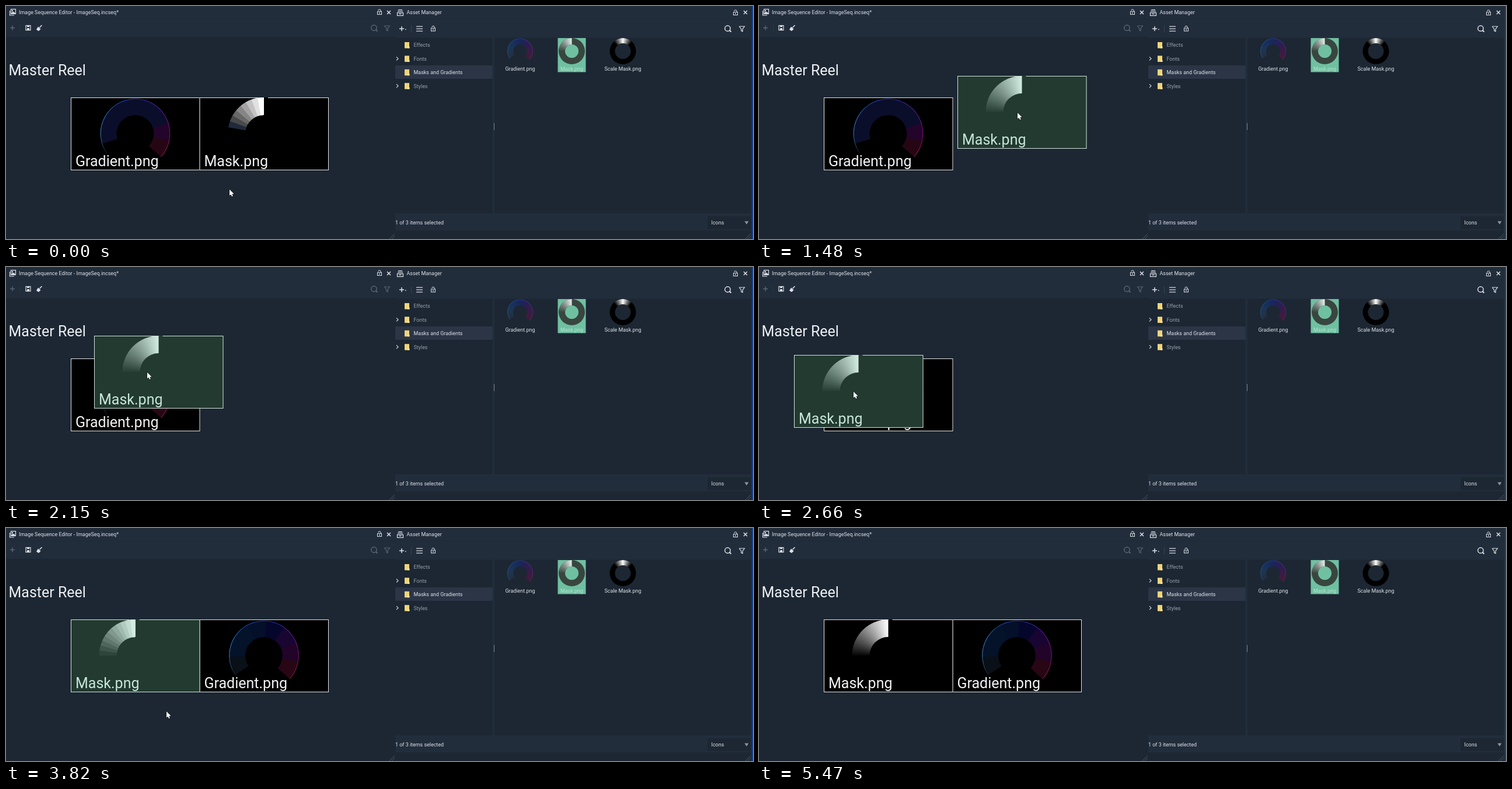
Recreate the animation shown at these times as an HTML page with a canvas. Size 1280 px wide and 400 px high, loop 6.51 s.

```html
<!DOCTYPE html>
<html lang="en">
<head>
<meta charset="utf-8">
<title>Reordering a reel</title>
<style>
html, body { margin: 0; width: 100%; height: 100%; overflow: hidden; background: #1c2733; }
canvas { display: block; }
</style>
</head>
<body>
<canvas id="stage" width="1280" height="400"></canvas>
<script>
const ctx = document.getElementById('stage').getContext('2d');
const LOOP = 6510, TICK = 131.7;
const GRAB = 10, DROP = 23, DESELECT = 30, LEAVE = 41; // in ticks
const BG = '#1c2733', BAR = '#222d3c', LIGHT = '#dde2e8', DIM = '#98a1ac', FAINT = '#596473';
const ROW = 157, CARD_W = 220.5, CARD_H = 124;
const slotX = slot => 111 + slot * CARD_W;

const linear = u => u;
const smooth = u => u * u * (3 - 2 * u);
const easeOut = u => 1 - (1 - u) ** 2;

// Pointer strokes between two ticks; bend lifts or lowers the middle of the path
const strokes = [
  { from: 3, to: 9, x: 434, y: 220, ease: smooth },
  { from: 9, to: 13, x: 446, y: 171, ease: easeOut },
  { from: 13, to: 14, x: 391, y: 159 },
  { from: 14, to: 16, x: 242, y: 181 },
  { from: 16, to: 20, x: 162, y: 214, ease: easeOut },
  { from: 25, to: 29, x: 275, y: 315 },
  { from: 31, to: 34, x: 596, y: 249, bend: 35 },
  { from: 34, to: 40, x: 1214, y: 394, bend: -45 }
];

function pointerAt(tick) {
  let x = 383, y = 315;
  for (const { from, to, x: endX, y: endY, ease = linear, bend = 0 } of strokes) {
    if (tick <= from) break;
    const u = ease(Math.min(1, (tick - from) / (to - from)));
    x += (endX - x) * u;
    y += (endY - y) * u + 4 * bend * u * (1 - u);
  }
  return { x, y };
}

// The dragged card trails sideways behind the pointer
function draggedCardAt(tick) {
  const now = pointerAt(tick), before = pointerAt(tick - 1);
  return { x: Math.floor(now.x - 102 - .15 * (now.x - before.x)), y: Math.floor(now.y - 63) };
}

const rad = degrees => degrees * Math.PI / 180;
const mix = (a, b, k) => `rgb(${a.map((v, i) => Math.round(v + (b[i] - v) * k))})`;

function rect(x, y, w, h, color) {
  ctx.fillStyle = color;
  ctx.fillRect(x, y, w, h);
}

function frame(x, y, w, h, color, width = 1) {
  ctx.strokeStyle = color;
  ctx.lineWidth = width;
  ctx.strokeRect(x, y, w, h);
}

function text(s, x, y, color = LIGHT, size = 8.95, align = 'left') {
  ctx.font = `${size}px Roboto, sans-serif`;
  ctx.textAlign = align;
  ctx.fillStyle = color;
  ctx.fillText(s, x, y);
}

function trace(points) {
  ctx.beginPath();
  for (let i = 0; i < points.length; i += 2) ctx.lineTo(points[i], points[i + 1]);
}

function line(color, width, ...points) {
  trace(points);
  ctx.strokeStyle = color;
  ctx.lineWidth = width;
  ctx.stroke();
}

function shape(color, ...points) {
  trace(points);
  ctx.fillStyle = color;
  ctx.fill();
}

function ring(x, y, inner, outer, from, to, fill) {
  ctx.fillStyle = fill;
  ctx.beginPath();
  ctx.arc(x, y, outer, rad(from), rad(to));
  ctx.arc(x, y, inner, rad(to), rad(from), true);
  ctx.fill();
}

// An arc whose colors blend evenly from one end to the other
function sweep(x, y, inner, outer, from, to, colors) {
  const gradient = ctx.createConicGradient(rad(from), x, y);
  colors.forEach((c, i) => gradient.addColorStop(i / (colors.length - 1) * (to - from) / 360, c));
  ring(x, y, inner, outer, from, to, gradient);
}

// An arc cut into equal flat wedges; each runs to the end so no seams show
function wedges(x, y, inner, outer, from, to, colors) {
  colors.forEach((c, i) => ring(x, y, inner, outer, from + (to - from) * i / colors.length, to, c));
}

function lock(x, y) {
  frame(x - 3.5, y - .5, 7, 5, LIGHT);
  ctx.beginPath();
  ctx.arc(x, y - 2, 2.2, Math.PI, 0);
  ctx.lineTo(x + 2.2, y - .5);
  ctx.stroke();
  rect(x - .7, y + 1, 1.4, 2, LIGHT);
}

function close(x, y) {
  line(LIGHT, 1.5, x - 3, y - 3, x + 3, y + 3);
  line(LIGHT, 1.5, x + 3, y - 3, x - 3, y + 3);
}

function plus(x, y, color) {
  rect(x - 4, y - .75, 8, 1.5, color);
  rect(x - .75, y - 4, 1.5, 8, color);
}

function magnifier(x, y, color) {
  ctx.strokeStyle = color;
  ctx.lineWidth = 1.5;
  ctx.beginPath();
  ctx.arc(x - .5, y - .5, 4.7, 0, 7);
  ctx.stroke();
  line(color, 2, x + 2.5, y + 2.5, x + 5.5, y + 5.5);
}

function funnel(x, y, color) {
  line(color, 1.2, x - 4.5, y - 4, x + 4.5, y - 4, x + 1.2, y + .5, x + 1.2, y + 4.5,
    x - 1.2, y + 3.5, x - 1.2, y + .5, x - 4.8, y - 4);
}

function grip(x) {
  for (const size of [9, 5]) line('#4b5666', 1, x - size, 400, x, 400 - size);
}

function editorPanel() {
  rect(0, 0, 667, 53, BAR);
  rect(0, 22, 667, 1, '#1f2a38');
  frame(8.5, 5.5, 8, 8, LIGHT, 1.2);
  line(LIGHT, 1.2, 6.5, 8, 6.5, 16, 14, 16);
  shape(LIGHT, 9, 13, 11.5, 9, 13, 11, 14, 10, 16, 13);
  rect(10, 7, 2, 2, LIGHT);
  text('Image Sequence Editor - ImageSeq.incseq*', 22, 14);
  lock(640, 10);
  close(656, 11);

  plus(11, 37.5, FAINT);
  rect(24, 32, 1, 12, '#2b3646');
  frame(34, 33.5, 8, 8, LIGHT, 1.2);
  rect(36, 33, 4, 3, LIGHT);
  rect(36, 38, 4, 3, LIGHT);
  line(LIGHT, 1.6, 61.5, 33, 57.5, 37);
  shape(LIGHT, 55, 35.5, 59.5, 39.5, 56, 43, 52, 40.5);
  magnifier(631, 38, FAINT);
  funnel(653, 38, FAINT);

  text('Master Reel', 4.5, 119, '#eef0f3', 25);
  grip(666);
}

function assetPanel() {
  rect(667, 0, 613, 54.5, BAR);
  rect(667, 22, 613, 1, '#1f2a38');
  line(LIGHT, 1.2, 672, 6.5, 679, 6.5);
  line(LIGHT, 1.2, 671, 9, 680, 9);
  frame(670.5, 11.5, 10, 5, LIGHT, 1.2);
  rect(673.5, 13, 4, 1.2, LIGHT);
  text('Asset Manager', 686.5, 14.3);
  lock(1250, 11);
  close(1267, 11);

  plus(678, 39, LIGHT);
  rect(684, 39.5, 1.5, 1.5, LIGHT);
  rect(694, 33, 1, 12, '#364152');
  for (let i = 0; i < 3; i++) rect(703, 34.5 + 4 * i, 11, 1.2, LIGHT);
  lock(732, 38.5);
  magnifier(1237, 39, LIGHT);
  funnel(1261, 39, LIGHT);

  rect(667, 102, 167, 23, '#2b3546');
  ['Effects', 'Fonts', 'Masks and Gradients', 'Styles'].forEach((name, i) => {
    const y = 67 + i * 23.4;
    rect(683, y - 5, 8, 10.5, '#f3d479');
    rect(688, y + 2.5, 3.5, 3, '#ffe9a6');
    text(name, 698.5, y + 3.3, i === 2 ? LIGHT : DIM);
    if (i % 2) line(LIGHT, 1.1, 669, y - 3, 672, y, 669, y + 3);
  });
  rect(833.5, 54, 3.5, 303, BAR);
  rect(836, 201, 1, 12, '#7d8794');

  thumbnails();

  rect(667, 356, 613, 29, BAR);
  text('1 of 3 items selected', 667, 375);
  rect(1202, 361, 74, 22, BG);
  text('Icons', 1208.5, 375);
  shape('#8b949f', 1265.5, 369.5, 1272.5, 369.5, 1269, 375);
  grip(1276);
  rect(1276, 0, 2, 400, BAR);
  rect(1278.5, 0, 1.5, 400, '#0b47a8');
}

function thumbnails() {
  const y = 77.5;
  const caption = (s, x, color) => text(s, x, 110.5, color, 8.95, 'center');
  ctx.save();
  ctx.beginPath();
  ctx.rect(837, 55, 440, 300);
  ctx.clip();
  sweep(881, y, 12, 21.5, 145, 402, ['#222e40', '#1e3550', '#17305c', '#19255c', '#2c1d52', '#3a1b47', '#401c37']);
  sweep(881, y, 21, 22, 145, 402, ['#2b4866', '#1f4d88', '#24368a', '#4d2670', '#60204c']);
  caption('Gradient.png', 881);

  rect(945.5, 55, 48, 58.5, '#6fc0a1');
  ring(969.5, y, 11.5, 22.5, 0, 360, '#394640');
  sweep(969.5, y, 11.5, 22.5, 180, 270, ['#394640', '#84908b', '#e2eee9']);
  caption('Mask.png', 969.5, '#b3e2d0');

  ring(1057, y, 13.5, 22.5, 0, 360, '#000');
  sweep(1057, y, 13.5, 22.5, 225, 315, ['#000', '#777', '#fff', '#777', '#000']);
  caption('Scale Mask.png', 1057);
  ctx.restore();
}

function card(x, y, name, background, ink, border, drawImage) {
  rect(x, y, CARD_W + 1, CARD_H + 1, background);
  frame(x + .5, y + .5, CARD_W, CARD_H, border);
  drawImage(x + 110.5, y + 62);
  text(name, x + 8, y + 117.5, ink, 25);
}

function gradientCard(slot) {
  const navy = Array(6).fill('#0a0e2a');
  const [from, bands] = slot
    ? [146, ['#0a1017', '#04122a', '#04122a', '#04102a', '#05062b', '#180531', '#210428', '#280614']]
    : [163, [...navy, '#23042b', '#270613']];
  card(slotX(slot), ROW, 'Gradient.png', '#000', '#f2f2f4', '#e6e6e8', (x, y) => {
    wedges(x, y, 32, 59, from, 402, bands);
    sweep(x, y, 58.9, 59.8, 145, 402,
      ['#0c1722', '#4684b4', '#2a69b8', '#1c3ebc', '#3227b0', '#701c9e', '#98177c', '#981b46']);
  });
}

function maskCard(x, y, selected, look) {
  const [dark, bright] = selected ? [[34, 58, 48], [211, 236, 226]] : [[0, 0, 0], [255, 255, 255]];
  const [ink, border] = selected ? ['#c8e6da', '#d5e5de'] : ['#f2f2f4', '#e6e6e8'];
  const shades = (count, low) =>
    Array.from({ length: count }, (_, i) => mix(dark, bright, low + (1 - low) * i / (count - 1)));
  const background = mix(dark, bright, 0);
  card(x, y, 'Mask.png', background, ink, border, (cx, cy) => {
    rect(cx, y, 7, 1, background);
    if (look === 'cut') wedges(cx, cy, 32, 62, 190, 270, ['#1f2a3c', ...shades(7, .29)]);
    else if (look === 'stepped') wedges(cx, cy, 32, 62, 180, 270, shades(11, .06));
    else sweep(cx, cy, 32, 62, 180, 270, shades(2, .02));
  });
}

function pointer({ x, y }) {
  ctx.save();
  ctx.translate(x, y);
  trace([0, 0, 0, 10.5, 2.4, 8.4, 4, 12, 5.8, 11.2, 4.3, 7.7, 7.6, 7.5]);
  ctx.closePath();
  ctx.strokeStyle = '#10151c';
  ctx.lineWidth = 1.2;
  ctx.stroke();
  ctx.fillStyle = '#fff';
  ctx.fill();
  ctx.restore();
}

function draw(time) {
  const tick = Math.floor(time / TICK);
  const dropped = tick >= DROP;
  rect(0, 0, 1280, 400, BG);
  editorPanel();
  assetPanel();
  gradientCard(dropped ? 1 : 0);
  if (dropped) {
    const selected = tick < DESELECT;
    maskCard(slotX(0), ROW, selected, selected ? 'stepped' : 'smooth');
  } else if (tick >= GRAB) {
    const { x, y } = draggedCardAt(tick);
    maskCard(x, y, true, 'smooth');
  } else {
    maskCard(slotX(1), ROW, false, 'cut');
  }
  if (tick < LEAVE) pointer(pointerAt(tick));
}

const start = performance.now();
function loop() {
  draw((performance.now() - start) % LOOP);
  requestAnimationFrame(loop);
}
loop();
</script>
</body>
</html>
```
